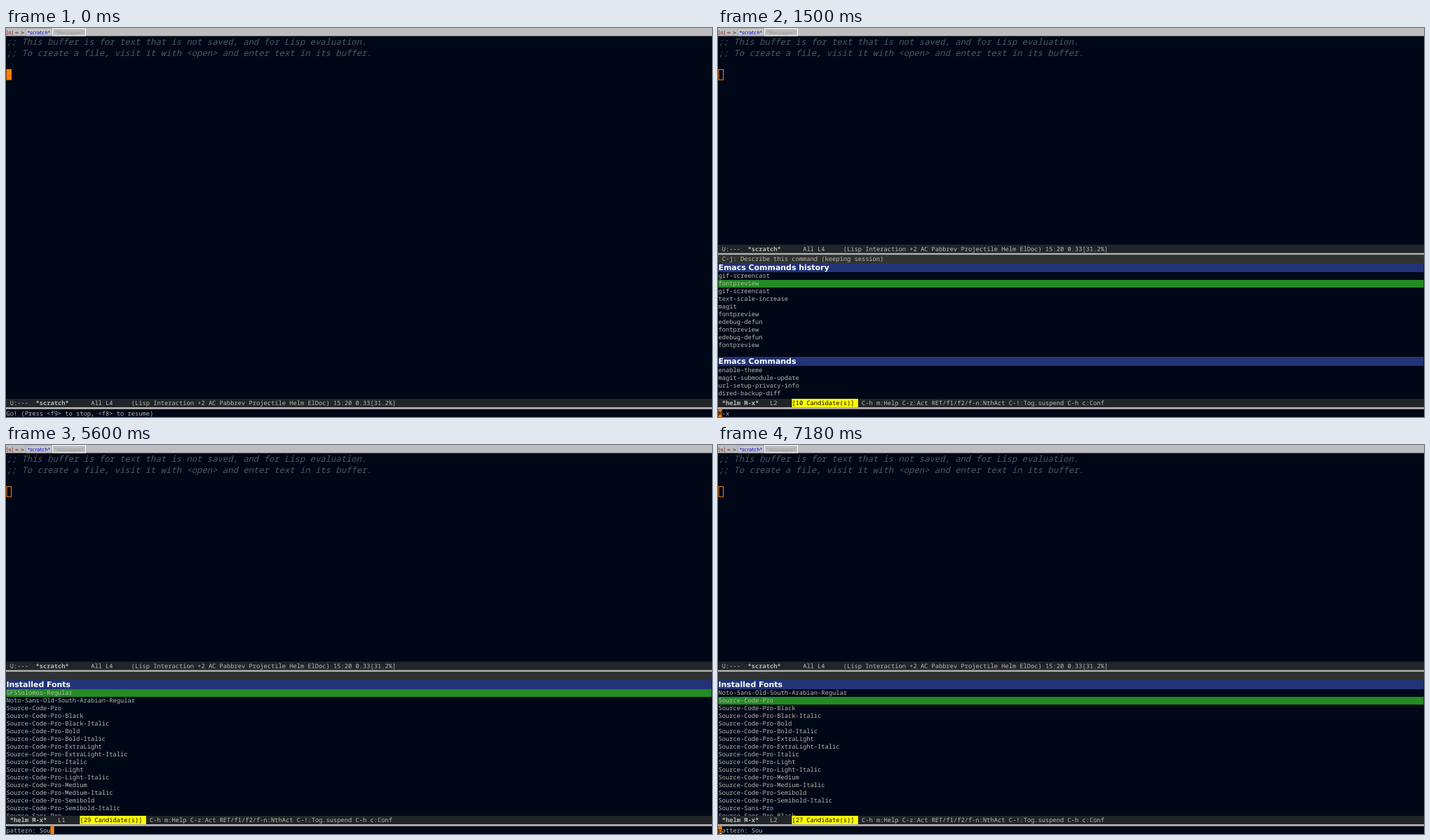
These frames come from a looping animation (1007 by 556 pixels, 8 s). An HTML page with a canvas:

```html
<!DOCTYPE html>
<html lang="en">
<head>
<meta charset="utf-8">
<title>Font preview</title>
<style>
html, body { margin: 0; width: 100%; height: 100%; overflow: hidden; background: #000817; }
canvas { display: block; }
</style>
</head>
<body>
<canvas id="stage" width="1007" height="556"></canvas>
<script>
const ctx = document.getElementById('stage').getContext('2d');
const W = 1007, H = 556, LOOP = 8000;
const LEFT = 0.5, COL = 5.245, ROW = 11.01;
const BG = '#000817', FG = '#b8b9b2', BAR = '#212529', ORANGE = '#ff8000';
const MONO = '"Noto Sans Mono", monospace', SANS = '"DejaVu Sans", sans-serif';
const SMALL = '8.742px ' + MONO, BOLD = 'bold ' + SMALL;
const BIG = 'italic 12.24px ' + MONO;
const TAB = '7px ' + SANS, HEAD = 'bold 10.95px ' + SANS;

const family = (name, styles) => [name, ...styles.map(s => name + '-' + s)];
const history = ['gif-screencast', 'fontpreview', 'gif-screencast', 'text-scale-increase', 'magit',
  'fontpreview', 'edebug-defun', 'fontpreview', 'edebug-defun', 'fontpreview'];
const commands = ['enable-theme', 'magit-submodule-update', 'url-setup-privacy-info', 'dired-backup-diff'];
const allFonts = [
  ...family('AvantGarde', ['Book', 'BookOblique', 'Demi', 'DemiOblique']).slice(1),
  ...family('Bookman', ['Demi', 'DemiItalic', 'Light', 'LightItalic']).slice(1),
  'Courier-BoldOblique', 'Courier-Oblique', 'fixed',
  ...family('Helvetica', ['Bold', 'BoldOblique', 'Narrow', 'Narrow-Bold', 'Narrow-BoldOblique'])];
const sFonts = [
  ...family('NewCenturySchlbk', ['Bold', 'BoldItalic', 'Italic', 'Roman']).slice(1), 'Symbol',
  ...family('DejaVu-Sans', ['Bold', 'BoldOblique', 'ExtraLight', 'Oblique']),
  ...family('DejaVu-Sans-Mono', ['Bold', 'BoldOblique', 'Oblique']),
  ...family('DejaVu-Serif', ['Bold', 'Italic'])];
const souFonts = ['Noto-Sans-Old-South-Arabian-Regular',
  ...family('Source-Code-Pro', ['Black', 'Black-Italic', 'Bold', 'Bold-Italic', 'ExtraLight',
    'ExtraLight-Italic', 'Italic', 'Light', 'Light-Italic', 'Medium', 'Medium-Italic',
    'Semibold', 'Semibold-Italic']),
  ...family('Source-Sans-Pro', ['Black'])];
const soFonts = ['GFSSolomos-Regular', ...souFonts.slice(0, -1)];

// Each state holds until the next one starts; cursor is a column of the echo line.
const fonts = (list, count, echo, cursor = echo.length, line = 0) =>
  ({ title: 'Installed Fonts', list, count, echo, cursor, line });
const helm = cursor => ({ title: 'Emacs Commands history', list: history, more: commands, count: 10,
  hint: 'C-j: Describe this command (keeping session)', echo: 'M-x ', cursor, line: 1 });
const states = [
  [0, { echo: 'Go! (Press <f9> to stop, <f8> to resume)' }],
  [1050, helm(4)],
  [1500, helm(0)],
  [5260, fonts(allFonts, 100, 'pattern: S')],
  [5430, fonts(sFonts, 100, 'pattern: So')],
  [5600, fonts(soFonts, 29, 'pattern: Sou')],
  [6750, fonts(souFonts, 27, 'pattern: Sou', 12, 1)],
  [7180, fonts(souFonts, 27, 'pattern: Sou', 0, 1)]];

function rect(x, y, w, h, color) {
  ctx.fillStyle = color;
  ctx.fillRect(x, y, w, h);
}

function frame(x, y, w, h, color) {
  ctx.strokeStyle = color;
  ctx.lineWidth = 1;
  ctx.strokeRect(x, y, w, h);
}

function text(str, x, y, font = SMALL, color = FG) {
  ctx.font = font;
  ctx.textRendering = 'geometricPrecision';
  ctx.fillStyle = color;
  ctx.fillText(str, x, y);
}

const cell = (str, col, y, font, color) => text(str, LEFT + col * COL, y, font, color);

function tabs() {
  rect(0, 0, W, 11.5, '#bebebe');
  text('[o]', 0.5, 8.5, TAB, '#8b1010');
  text('= >', 12.5, 8.5, TAB, '#402020');
  rect(28, 0.5, 37.5, 10.5, '#c6c6c6');
  frame(28, 0.5, 37.5, 10.5, '#a8a8a8');
  text('*scratch*', 30.4, 8.5, TAB, '#0000f0');
  frame(66.5, 0.5, 47, 10.5, '#ffffff');
  text('*Messages*', 69.3, 8.5, TAB, '#989898');
}

function modeBar(y) {
  rect(0, y, W, 12, BAR);
  rect(0, y + 12, W, 2.8, '#b0b0ae');
}

function scratch(barY, active) {
  text(';; This buffer is for text that is not saved, and for Lisp evaluation.', LEFT, 24, BIG, '#50565f');
  text(';; To create a file, visit it with <open> and enter text in its buffer.', LEFT, 39.5, BIG, '#50565f');
  if (active) rect(0.5, 58.7, 7.4, 15.7, ORANGE);
  else frame(1, 59.5, 6.5, 14.5, ORANGE);
  modeBar(barY);
  const y = barY + 9;
  cell('U:---', 1, y);
  cell('*scratch*', 8, y, BOLD);
  cell('All L4', 23, y);
  cell('(Lisp Interaction +2 AC Pabbrev Projectile Helm ElDoc) 15:20 0.33[31.2%]', 34, y);
}

function heading(str, y) {
  rect(0.5, y, W - 1, 13, '#223377');
  text(str, LEFT, y + 10.2, HEAD, '#ffffff');
}

function rows(list, top) {
  list.forEach((name, i) => cell(name, 0, top + i * ROW + 8.2));
}

function picker(s) {
  rect(0, 324.6, W, 11.4, '#303231');
  if (s.hint) cell(s.hint, 1, 333.2);
  heading(s.title, 336);
  rect(0.5, 349 + s.line * ROW, W - 1, ROW, '#228b22');
  rows(s.list, 349);
  if (s.more) {
    heading('Emacs Commands', 470);
    rows(s.more, 483.3);
  }
  modeBar(530);
  cell('*helm M-x*', 1, 539, BOLD);
  cell('L' + (s.line + 1), 14, 539);
  rect(LEFT + 20 * COL, 530, 18 * COL, 12, '#ffff00');
  cell(`[${s.count} Candidate(s)]`, 20, 539, SMALL, '#000000');
  cell('C-h m:Help C-z:Act RET/f1/f2/f-n:NthAct C-!:Tog.suspend C-h c:Conf', 39, 539);
}

function echoLine(s) {
  cell(s.echo, 0, 553.6);
  if (s.cursor === undefined) return;
  rect(LEFT + s.cursor * COL, 545, COL, 11, ORANGE);
  cell(s.echo[s.cursor] || '', s.cursor, 553.6, SMALL, BG);
}

function draw(now) {
  const t = now % LOOP;
  const s = states.findLast(([start]) => t >= start)[1];
  rect(0, 0, W, H, BG);
  tabs();
  scratch(s.list ? 309.6 : 530, !s.list);
  if (s.list) picker(s);
  echoLine(s);
  requestAnimationFrame(tick);
}

const tick = () => draw(performance.now());
tick();
</script>
</body>
</html>
```
